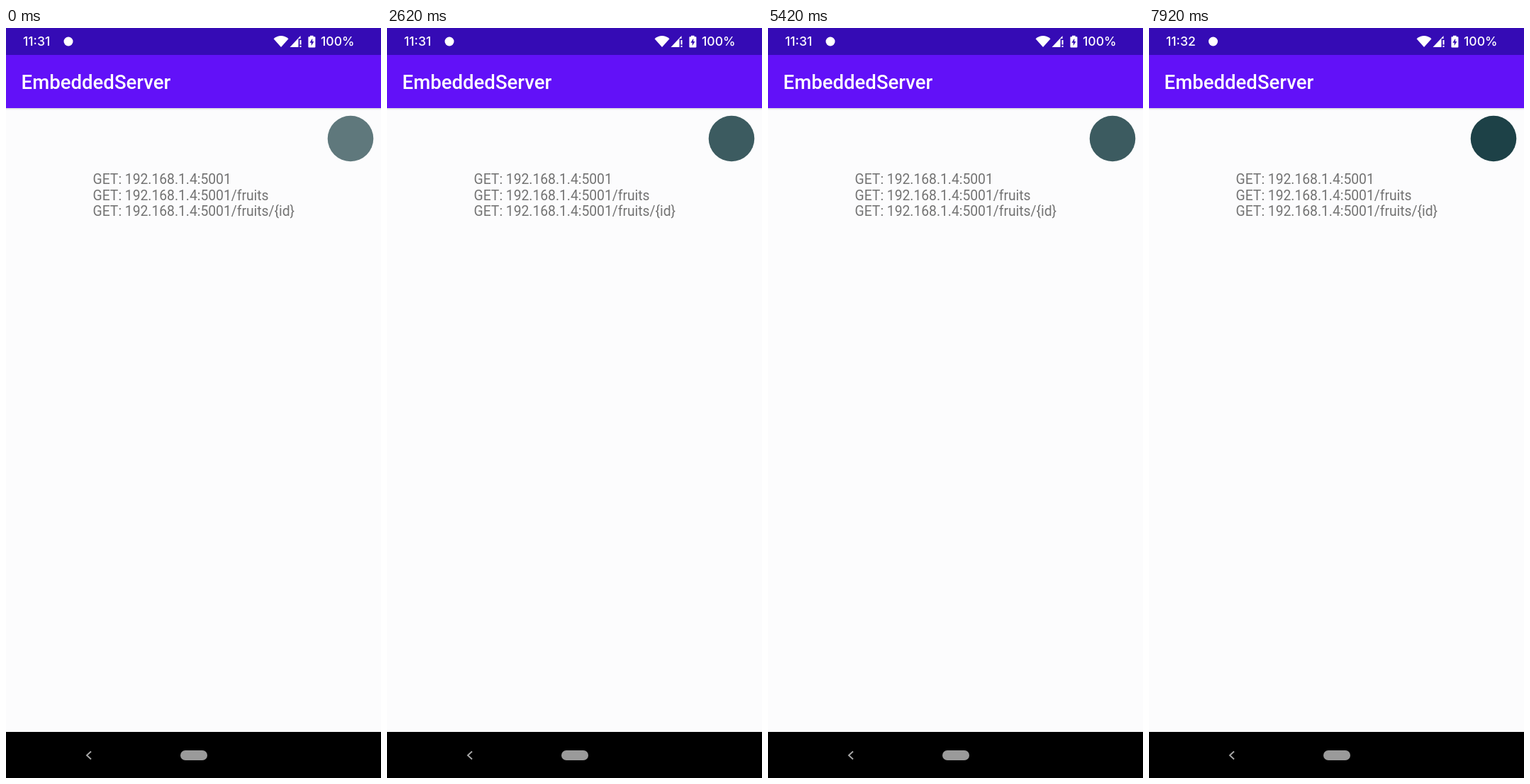
An HTML page for the animation above (8000 ms loop, 529x1058 px).

```html
<!DOCTYPE html>
<html lang="en">
<head>
<meta charset="utf-8">
<title>EmbeddedServer</title>
<style>
  html, body { margin: 0; width: 100%; height: 100%; overflow: hidden; background: #fcfcfd; }
  svg { display: block; width: 100%; height: 100%; }
  text { font-family: Roboto, sans-serif; white-space: pre; }
  .status { font: 500 17.6px Inter, sans-serif; fill: #fff; }
  .title { font-size: 27.55px; font-weight: 500; fill: #fff; }
  .route { font-size: 19.29px; fill: #737373; }
</style>
</head>
<body>
<svg viewBox="0 0 529 1058">
  <defs>
    <linearGradient id="shade" x2="0" y2="1">
      <stop offset="0" stop-color="#000" stop-opacity=".14"/>
      <stop offset="1" stop-color="#000" stop-opacity="0"/>
    </linearGradient>
  </defs>
  <rect width="529" height="1058" fill="#fcfcfd"/>
  <rect y="113" width="529" height="3" fill="url(#shade)"/>
  <rect y="38" width="529" height="75" fill="#6211f8"/>
  <rect width="529" height="38" fill="#350bb5"/>

  <text id="clock" class="status" x="24" y="25.4">11:31</text>
  <circle id="notice" cx="88" cy="19" r="6.5" fill="#fff"/>

  <g fill="#fff">
    <path d="M377.5 15.2Q388 7 398.5 15.2L388 27Z"/>
    <path d="M400.5 27L415.5 11V15H412.5V27Z"/>
    <path d="M414.5 17H416.5V23.5H414.5ZM414.5 25H416.5V27H414.5Z"/>
    <path d="M429 12.3V10.8H433.6V12.3H435.4Q436.4 12.3 436.4 13.3V26.4Q436.4 27.4 435.4 27.4H427.4Q426.4 27.4 426.4 26.4V13.3Q426.4 12.3 427.4 12.3Z"/>
  </g>
  <path d="M432.2 14.8L428.4 20.8H430.7V25L434.4 19H432.2Z" fill="#350bb5"/>
  <text class="status" x="491.5" y="25.4" text-anchor="end">100%</text>

  <text class="title" x="21.6" y="86.4">EmbeddedServer</text>

  <g class="route">
    <text x="122.6" y="220.2">GET: 192.168.1.4:5001</text>
    <text x="122.6" y="242.8">GET: 192.168.1.4:5001/fruits</text>
    <text x="122.6" y="265.3">GET: 192.168.1.4:5001/fruits/{id}</text>
  </g>

  <circle id="bubble" cx="486" cy="156" r="32.3" fill="#12383e"/>

  <rect y="993" width="529" height="65" fill="#000"/>
  <path d="M120 1020.5L114 1026L120 1031.5" fill="none" stroke="#a8a8a8" stroke-width="1.9"/>
  <rect x="246" y="1019" width="38" height="14" rx="7" fill="#9a9a9a"/>
</svg>
<script>
const LOOP = 8000, MINUTE = 6200;
const PULSE = 60, LOW = 11;          // pulse length and dimmest point, in ticks
const SHORT_GROUPS = [0, 9, 26, 38]; // groups with two ticks instead of three
const $ = id => document.getElementById(id);

// Ticks come in uneven groups: two quick ones, then a long hold.
const ticks = [];
for (let t = 0, g = 0; t < LOOP; g++) {
  const group = SHORT_GROUPS.includes(g) ? [20, 100] : [20, 20, 100];
  for (const hold of group) {
    ticks.push(t);
    t += hold;
  }
}

function tickAt(time) {
  let i = ticks.length - 1;
  while (ticks[i] > time) i--;
  return i;
}

function opacity(tick) {
  const phase = (tick - LOW + PULSE) % PULSE / PULSE;
  return 0.276 + 0.724 * Math.sin(Math.PI * phase);
}

const start = performance.now();

function draw() {
  const time = (performance.now() - start) % LOOP;
  const next = time >= MINUTE;
  $('bubble').setAttribute('opacity', opacity(tickAt(time)).toFixed(3));
  $('clock').textContent = next ? '11:32' : '11:31';
  $('notice').setAttribute('cx', next ? 90.5 : 88);
  requestAnimationFrame(draw);
}
draw();
</script>
</body>
</html>
```
